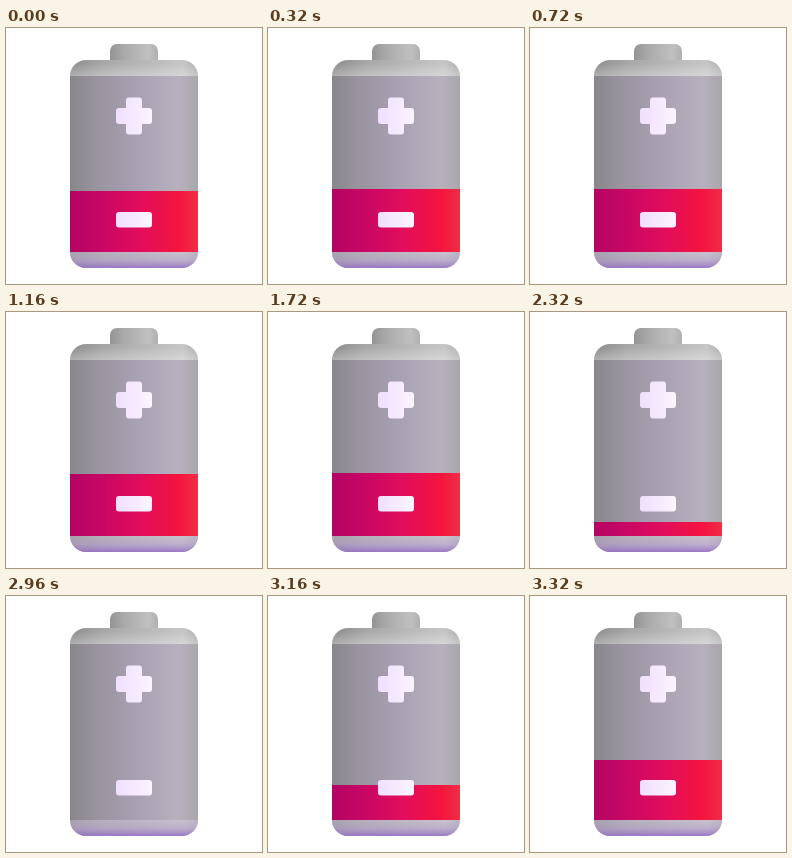
An HTML page that plays this animation: 256 by 256 pixels, repeating every 3.36 s.

```html
<!DOCTYPE html>
<html lang="en">
<head>
<meta charset="utf-8">
<title>Low battery</title>
<style>
html, body { margin: 0; width: 100%; height: 100%; overflow: hidden; background: #fff; }
svg { display: block; width: 100vw; height: 100vh; }

/* The charge bobs while creeping up, drains, stays empty, then refills. */
#charge { animation: level 3360ms ease-in-out infinite; }
@keyframes level {
  0%     { transform: translateY(163px); }
  8.5%   { transform: translateY(160.6px); }
  17%    { transform: translateY(162.4px); }
  25.5%  { transform: translateY(160px); }
  34%    { transform: translateY(161.8px); }
  42.5%  { transform: translateY(159.4px); }
  51%    { transform: translateY(161.2px); }
  59.5%  { transform: translateY(158.8px); }
  73.8%  { transform: translateY(225px); }
  86.9%  { transform: translateY(225px); }
  100%   { transform: translateY(163px); }
}
</style>
</head>
<body>
<svg viewBox="0 0 256 256">
  <defs>
    <linearGradient id="nub">
      <stop offset="0" stop-color="#949494"/>
      <stop offset=".3" stop-color="#aaa"/>
      <stop offset=".8" stop-color="#c0c0c0"/>
      <stop offset="1" stop-color="#b0b0b0"/>
    </linearGradient>
    <linearGradient id="cap">
      <stop offset="0" stop-color="#8c8c8c"/>
      <stop offset=".25" stop-color="#a6a6a6"/>
      <stop offset=".6" stop-color="#b8b8b8"/>
      <stop offset=".88" stop-color="#c6c6c6"/>
      <stop offset="1" stop-color="#aeaeae"/>
    </linearGradient>
    <linearGradient id="sheen" x1="0" y1="0" x2="0" y2="1">
      <stop offset=".2" stop-color="#fff" stop-opacity="0"/>
      <stop offset="1" stop-color="#fff" stop-opacity=".3"/>
    </linearGradient>
    <linearGradient id="body">
      <stop offset="0" stop-color="#89868b"/>
      <stop offset=".2" stop-color="#98939d"/>
      <stop offset=".55" stop-color="#a9a2b4"/>
      <stop offset=".85" stop-color="#b7b1bd"/>
      <stop offset="1" stop-color="#a9a6ab"/>
    </linearGradient>
    <linearGradient id="red">
      <stop offset="0" stop-color="#b40464"/>
      <stop offset=".25" stop-color="#c80764"/>
      <stop offset=".55" stop-color="#e20d5c"/>
      <stop offset=".85" stop-color="#f4143f"/>
      <stop offset="1" stop-color="#f02e45"/>
    </linearGradient>
    <linearGradient id="glow" x1="0" y1="0" x2="0" y2="1">
      <stop offset="0" stop-color="#c8bcd6" stop-opacity=".45"/>
      <stop offset=".5" stop-color="#b8a2d2" stop-opacity=".6"/>
      <stop offset="1" stop-color="#956fc2" stop-opacity=".9"/>
    </linearGradient>
    <linearGradient id="sign" gradientUnits="userSpaceOnUse" x1="110" x2="146">
      <stop offset="0" stop-color="#efdffd"/>
      <stop offset="1" stop-color="#fcf4ff"/>
    </linearGradient>
    <clipPath id="shell"><rect x="64" y="32" width="128" height="208" rx="16"/></clipPath>
    <clipPath id="tube"><rect x="64" y="48" width="128" height="176"/></clipPath>
  </defs>

  <rect x="104" y="16" width="48" height="24" rx="7" fill="url(#nub)"/>
  <g clip-path="url(#shell)">
    <rect x="64" y="32" width="128" height="208" fill="url(#cap)"/>
    <rect x="64" y="32" width="128" height="16" fill="url(#sheen)"/>
    <rect x="64" y="224" width="128" height="16" fill="url(#glow)"/>
    <rect x="64" y="48" width="128" height="176" fill="url(#body)"/>
  </g>
  <g clip-path="url(#tube)">
    <rect id="charge" x="64" width="128" height="80" fill="url(#red)"/>
  </g>
  <g fill="url(#sign)">
    <rect x="120" y="69.5" width="16" height="37" rx="3"/>
    <rect x="110" y="80" width="36" height="16" rx="3"/>
    <rect x="110" y="184" width="36" height="15.5" rx="3"/>
  </g>
</svg>
</body>
</html>
```
